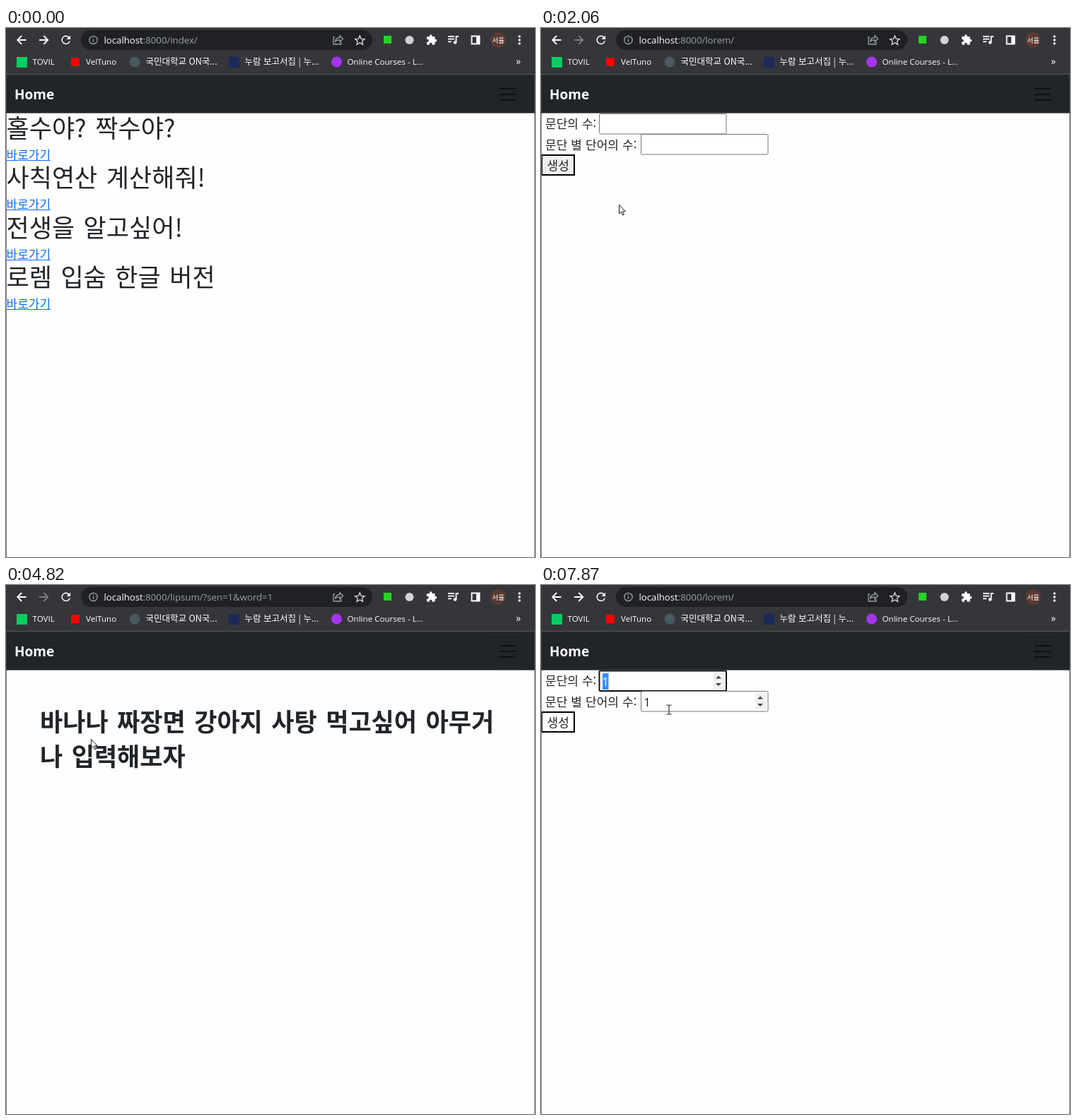
An HTML page for the animation above (8000 ms loop, 748 px wide and 749 px high).

```html
<!DOCTYPE html>
<html lang="ko">
<head>
<meta charset="utf-8">
<title>Home</title>
<style>
html, body { margin: 0; width: 100%; height: 100%; overflow: hidden; background: #fff; }
svg { display: block; }
text { white-space: pre; }
.ui { font-family: "Open Sans", "Noto Sans", sans-serif; fill: #fff; }
.ko { font-family: "Noto Sans CJK KR", "Noto Sans CJK", sans-serif; fill: #fff; }
.url { font-size: 13.2px; }
.mark { font-size: 11.6px; }
.ko.mark { font-size: 12.5px; }
.head { font-size: 35px; font-weight: 350; word-spacing: 2.7px; fill: #212529; }
.bold { font-weight: 700; }
.body { font-size: 17px; font-weight: 350; word-spacing: .3px; fill: #212529; }
.line { fill: none; stroke: #fff; stroke-width: 1.8; }
.link text, .link rect { fill: #0d6efd; }
.link.hover text, .link.hover rect { fill: #0a58ca; }
</style>
</head>
<body>
<svg id="stage" width="748" height="749" viewBox="0 0 748 749">
  <rect width="748" height="749" fill="#fefefe"/>

  <g id="index"></g>

  <g id="form">
    <text class="ko body" x="6" y="142">문단의 수:</text>
    <text class="ko body" x="6" y="171.5">문단 별 단어의 수:</text>
    <rect id="button" x="1" y="180" width="46" height="28" stroke="#000" stroke-width="2"/>
    <text class="ko body" x="8.5" y="200.5">생성</text>
  </g>

  <g id="result">
    <text class="ko head bold" x="48" y="206.5">바나나 짜장면 강아지 사탕 먹고싶어 아무거</text>
    <text class="ko head bold" x="48" y="255.5">나 입력해보자</text>
  </g>

  <path d="M.5 121V749M747.5 121V749" stroke="#77787a"/>

  <!-- browser bars -->
  <rect width="748" height="66" fill="#35363a"/>
  <rect y="65" width="748" height="1" fill="#55575b"/>
  <rect y="66" width="748" height="54.6" fill="#212529"/>
  <path d="M.5 66V121M747.5 66V121" stroke="#3c4043"/>
  <text class="ui" x="12" y="101" font-size="19" font-weight="700">Home</text>
  <rect x="682.5" y="74.5" width="54" height="39" rx="4" fill="none" stroke="#000" stroke-opacity=".1"/>
  <path d="M698 86h23M698 94h23M698 102h23" stroke="#0e1012" stroke-width="2.2"/>

  <circle id="backHover" cx="22" cy="17" r="14" fill="#4a4b4f"/>
  <path class="line" d="M28.5 17H17M22.2 11l-6 6 6 6"/>
  <path id="forward" class="line" d="M47 17h11.5M53.3 11l6 6-6 6"/>
  <path transform="translate(75.3 7.4) scale(.79)" fill="#fff" d="M17.65 6.35A7.96 7.96 0 0 0 12 4a8 8 0 1 0 7.73 10h-2.08A6 6 0 1 1 12 6c1.66 0 3.14.69 4.22 1.78L13 11h7V4z"/>

  <rect x="106" y="3" width="412" height="28" rx="14" fill="#202124"/>
  <g fill="none" stroke="#9aa0a6" stroke-width="1.3">
    <circle cx="123.5" cy="17" r="5.7"/>
    <path d="M123.5 16v4M123.5 13.3v1.4"/>
    <path d="M465 13h-2v10h11v-3M465.5 19c.5-4 3-5.5 6.5-5.5v-3l4.5 4.7-4.5 4.6v-3c-3 0-5 .5-6.5 2.2z"/>
  </g>
  <path transform="translate(500.3 17.4)" fill="none" stroke="#dfe1e5" stroke-width="1.3" d="M0-6.5l1.9 4.4 4.8.4-3.6 3.1 1.1 4.7L0 3.6l-4.2 2.5 1.1-4.7-3.6-3.1 4.8-.4z"/>
  <text class="ui url" x="138.5" y="22">localhost<tspan id="path" fill="#9aa0a6"></tspan></text>

  <rect x="534" y="11" width="11" height="11" fill="#25d321"/>
  <circle cx="570.5" cy="17" r="6" fill="#d0d2d5"/>
  <path transform="translate(593.5 8.5) scale(.69)" fill="#fff" d="M20.5 11H19V7c0-1.1-.9-2-2-2h-4V3.5a2.5 2.5 0 0 0-5 0V5H4c-1.1 0-2 .9-2 2v3.8h1.5a2.7 2.7 0 0 1 0 5.4H2V20c0 1.1.9 2 2 2h3.8v-1.5a2.7 2.7 0 0 1 5.4 0V22H17c1.1 0 2-.9 2-2v-4h1.5a2.5 2.5 0 0 0 0-5z"/>
  <path class="line" d="M625 12h9M625 15.7h9M625 19.4h5M636.5 20.5v-8.5h3.5"/>
  <circle cx="635" cy="20.5" r="2.3" fill="#fff"/>
  <path class="line" d="M658.5 11.5h11v11h-11z"/>
  <path d="M665 11h5v12h-5z" fill="#fff"/>
  <circle cx="696" cy="17" r="11" fill="#5b3a32"/>
  <text class="ko" x="696" y="20.5" font-size="9.5" text-anchor="middle">서율</text>
  <g fill="#fff"><circle cx="726" cy="12" r="1.7"/><circle cx="726" cy="17" r="1.7"/><circle cx="726" cy="22" r="1.7"/></g>

  <rect x="15" y="41" width="15" height="15" fill="#06cd63"/>
  <text class="ui mark" x="37.5" y="52">TOVIL</text>
  <rect x="92" y="42" width="12" height="12" fill="#f00"/>
  <text class="ui mark" x="113" y="52">VelTuno</text>
  <circle cx="182" cy="48" r="7.5" fill="#465a60"/>
  <text class="ko mark" x="197.5" y="52.3">국민대학교 ON국...</text>
  <rect x="315" y="41" width="15" height="15" fill="#1b2a5a"/>
  <text class="ko mark" x="337.5" y="52.3">누람 보고서집 | 누...</text>
  <circle cx="467.5" cy="48" r="7.5" fill="#a435f0"/>
  <text class="ui mark" x="482.5" y="52">Online Courses - L...</text>
  <text class="ui" x="721" y="52" font-size="14">»</text>

  <g id="status">
    <path d="M0 731h123q4 0 4 4v14H0z" fill="#202124"/>
    <text class="ui" x="3.5" y="745.5" font-size="11.3">localhost:8000/lorem/</text>
  </g>

  <g id="tip">
    <rect x="29.5" y="27.5" width="379" height="24" fill="#2b2b2b" stroke="#85868a"/>
    <text class="ko" x="37.5" y="45" font-size="12.5" word-spacing="1">클릭하면 이전 페이지로 가고 누르고 있으면 방문 기록이 나타납니다.</text>
  </g>

  <g id="cursor">
    <path id="arrow" d="M.5.5V13l2.9-2.7 2.1 4.7 1.9-.9-2-4.5h3.8z" fill="#fff" stroke="#000" stroke-width=".9"/>
    <path id="hand" d="M-1.5 1q1.5-2 3 0v6.5q1.5-1 2.8.3 1.6-.8 2.7.6 2.3-.6 2.5 1.6v5.5q-.5 2.5-2 4v2h-8v-2q-3-4-5.5-7.5-.5-2 1.5-1.5l3 2.5z" fill="#fff" stroke="#000" stroke-width=".9"/>
    <path id="beam" d="M-3.5-6h2.5l1 1 1-1h2.5M0-5V6M-3.5 7h2.5l1-1 1 1h2.5" fill="none" stroke="#333" stroke-width="1.2"/>
  </g>
</svg>

<script>
const $ = id => document.getElementById(id);
const LOOP = 8000, TICK = 98.3;

function add(parent, tag, attrs, text) {
  const el = document.createElementNS('http://www.w3.org/2000/svg', tag);
  for (const k in attrs) el.setAttribute(k, attrs[k]);
  if (text) el.textContent = text;
  parent.appendChild(el);
  return el;
}
const show = (el, on) => { el.style.display = on ? '' : 'none'; };

// link list page
const titles = ['홀수야? 짝수야?', '사칙연산 계산해줘!', '전생을 알고싶어!', '로렘 입숨 한글 버전'];
const links = titles.map((title, i) => {
  const y = 70.3 * i;
  add($('index'), 'text', { class: 'ko head', x: 0.5, y: 155 + y }, title);
  const link = add($('index'), 'g', { class: 'link' });
  add(link, 'text', { class: 'ko body', x: 0.5, y: 186 + y }, '바로가기');
  add(link, 'rect', { x: 1, y: Math.round(187 + y), width: 62, height: 1 });
  return link;
});

// number inputs
function makeField(x, y) {
  const g = add($('form'), 'g', { transform: `translate(${x} ${y})` });
  const box = add(g, 'rect', { x: 0.5, y: 0.5, width: 179.5, height: 28.5, rx: 1.5, fill: '#fff' });
  const mark = add(g, 'rect', { x: 5, y: 4, width: 8.5, height: 23, fill: '#3390ff' });
  const value = add(g, 'text', { class: 'ui', x: 4.5, y: 21.5, 'font-size': 16 }, '1');
  const caret = add(g, 'rect', { x: 4, y: 4, width: 1, height: 22, fill: '#000' });
  const spin = add(g, 'g', {});
  add(spin, 'rect', { x: 162, y: 3, width: 15, height: 23, fill: '#f0f0f0' });
  add(spin, 'path', { d: 'M165 11.5l4-4 4 4zM165 18l4 4 4-4z', fill: '#444' });
  return s => {
    box.setAttribute('stroke', s.focus ? '#101010' : '#767676');
    box.setAttribute('stroke-width', s.focus ? 2 : 1);
    value.style.fill = s.selected ? '#fff' : '#111';
    show(mark, s.selected);
    show(value, s.filled);
    show(caret, s.focus && !s.selected);
    caret.setAttribute('x', s.filled ? 14 : 4);
    show(spin, s.focus || s.hover);
  };
}
const field1 = makeField(82, 121), field2 = makeField(141, 150);

// pointer path: tick, x, y
const route = [
  [2, 499, 9], [5, 250, 170], [8, 40, 385], [9, 27, 394], [15, 27, 394], [16, 26, 392], [18, 26, 392],
  [21, 110, 250], [24, 188, 156], [25, 190, 142], [27, 190, 142], [29, 198, 170], [30, 200, 174],
  [33, 200, 174], [36, 120, 204], [38, 50, 213], [40, 22, 201], [45, 22, 201], [49, 120, 218],
  [51, 120, 218], [53, 181, 165], [55, 85, 65], [57, 22, 14], [65, 22, 14], [68, 75, 75],
  [71, 150, 153], [73, 160, 142], [75, 160, 142], [78, 181, 179], [79, 181, 179], [80, 181, 176]
];
function pointAt(n) {
  const i = route.findIndex(k => k[0] > n);
  if (i < 0) return route[route.length - 1].slice(1);
  if (i === 0) return route[0].slice(1);
  const [a, x, y] = route[i - 1], [b, u, v] = route[i];
  const p = (n - a) / (b - a);
  return [x + (u - x) * p, y + (v - y) * p];
}

function draw(n) {
  const during = (a, b) => n >= a && n < b;
  const [x, y] = pointAt(n);
  const again = n >= 66;
  const onForm = during(18, 44) || again;

  show($('index'), n < 18);
  show($('form'), onForm);
  show($('result'), during(44, 66));
  links[3].classList.toggle('hover', during(8, 18));
  $('path').textContent = n < 16 ? ':8000/index/'
    : during(43, 66) ? ':8000/lipsum/?sen=1&word=1' : ':8000/lorem/';
  $('forward').style.stroke = n < 16 || again ? '#fff' : '#7b7c80';
  show($('backHover'), during(57, 74));
  show($('tip'), during(63, 65));
  show($('status'), during(11, 18));
  $('status').style.opacity = n < 12 ? 0.5 : 1;

  const over1 = onForm && x > 82 && x < 263 && y > 121 && y < 155;
  const over2 = onForm && !over1 && x > 141 && x < 321 && y > 150 && y < 181;
  field1({ focus: during(25, 30) || n >= 75, filled: n >= 27, selected: n >= 75, hover: over1 });
  field2({ focus: during(30, 44), filled: n >= 33, selected: false, hover: over2 });
  $('button').setAttribute('fill', again ? '#fdfdfd' : '#efefef');

  const hand = during(8, 16), beam = over1 || over2;
  show($('cursor'), n >= 2);
  show($('hand'), hand);
  show($('beam'), beam);
  show($('arrow'), !hand && !beam);
  $('cursor').setAttribute('transform', `translate(${Math.round(x)} ${Math.round(y)})`);
}

const start = performance.now();
function frame() {
  const t = (performance.now() - start) % LOOP;
  draw(Math.floor((t + 10) / TICK));
  requestAnimationFrame(frame);
}
frame();
</script>
</body>
</html>
```
